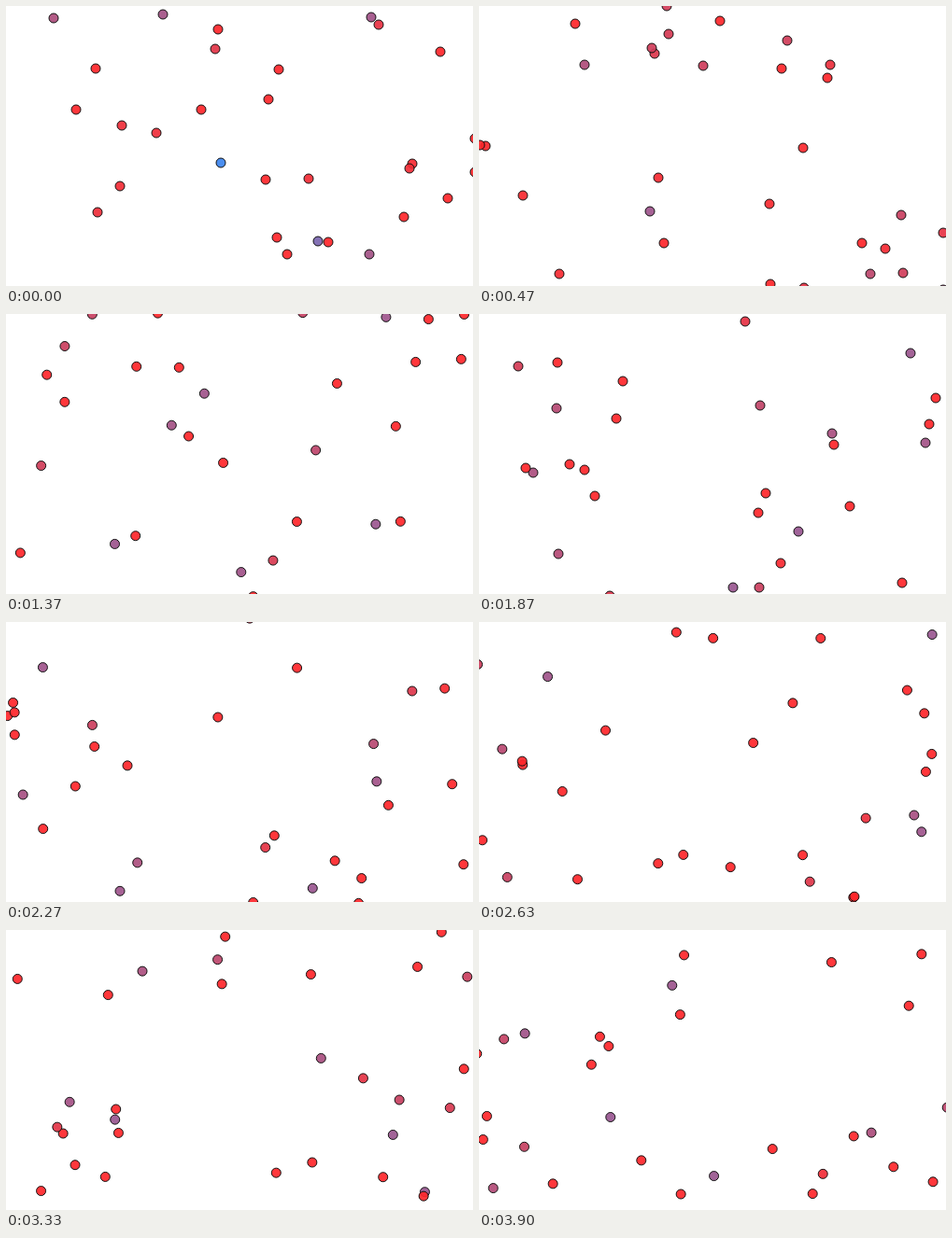
An HTML page that plays this animation: 500x300 px, repeating every 3930 ms.

```html
<!DOCTYPE html>
<html lang="en">
<head>
<meta charset="utf-8">
<title>Drifting particles</title>
<style>
  html, body { margin: 0; width: 100%; height: 100%; overflow: hidden; background: #fff; }
  svg { display: block; width: 500px; height: 300px; }
  circle { stroke: #111; stroke-width: 1; fill-opacity: .92; }
</style>
</head>
<body>
<svg id="stage" viewBox="0 0 500 300"></svg>
<script>
const LOOP = 3930, STEP = 100 / 3, LAST = 117, SPAN = 14, MARGIN = 10;
const HOT = [255, 38, 42], COOL = [60, 132, 238];

// start x, y; x, y after SPAN steps; coolness at the start
const particles = [
  [51, 13, 113, 63, .42], [168, 9, 201, 0, .47], [227, 25, 258, 16], [224, 46, 203, 30, .15],
  [391, 12, 330, 37, .48], [399, 20, 376, 63, .12], [465, 49, 373, 77], [96, 67, 103, 19],
  [292, 68, 240, 64], [281, 100, 324, 67], [75, 111, 7, 150], [124, 128, 188, 51, .08],
  [161, 136, 192, 184, .08], [209, 111, 185, 45], [230, 168, 183, 220, 1], [435, 169, 347, 152, .04],
  [432, 174, 452, 224, .06], [502, 142, 521, 149], [502, 178, 497, 243], [278, 186, 198, 254],
  [324, 185, 311, 212, .06], [473, 206, 454, 286], [122, 193, 47, 203, .06], [98, 221, 86, 287, .08],
  [426, 226, 435, 260], [290, 248, 312, 298], [301, 266, 348, 302], [345, 253, 410, 254],
  [334, 252, 419, 287, .68], [389, 266, 497, 304, .47]
];

const stage = document.getElementById('stage');
const dots = particles.map(() => {
  const dot = document.createElementNS('http://www.w3.org/2000/svg', 'circle');
  dot.setAttribute('r', 5);
  return stage.appendChild(dot);
});

function wrap(value, size) {
  const range = size + 2 * MARGIN;
  return ((value + MARGIN) % range + range) % range - MARGIN;
}

const mix = k => `rgb(${HOT.map((c, i) => Math.round(c + (COOL[i] - c) * k))})`;

// Starting coolness fades while brief individual cool spells take over.
function coolness(start, index, step) {
  const fade = Math.min(1, step / 28);
  const spell = Math.max(0, Math.sin(step * (.07 + index % 5 * .012) + index * 2.4) - .3);
  return start * (1 - fade) + spell * fade * .75;
}

function draw(time) {
  const step = Math.min(LAST, Math.floor((time % LOOP + 3.4) / STEP));
  const progress = step / SPAN;
  particles.forEach(([x, y, nextX, nextY, cool = 0], i) => {
    const dot = dots[i];
    dot.setAttribute('cx', wrap(x + (nextX - x) * progress, 500));
    dot.setAttribute('cy', wrap(y + (nextY - y) * progress, 300));
    dot.setAttribute('fill', mix(coolness(cool, i, step)));
  });
}

const begin = performance.now();
function tick() {
  draw(performance.now() - begin);
  requestAnimationFrame(tick);
}
tick();
</script>
</body>
</html>
```
